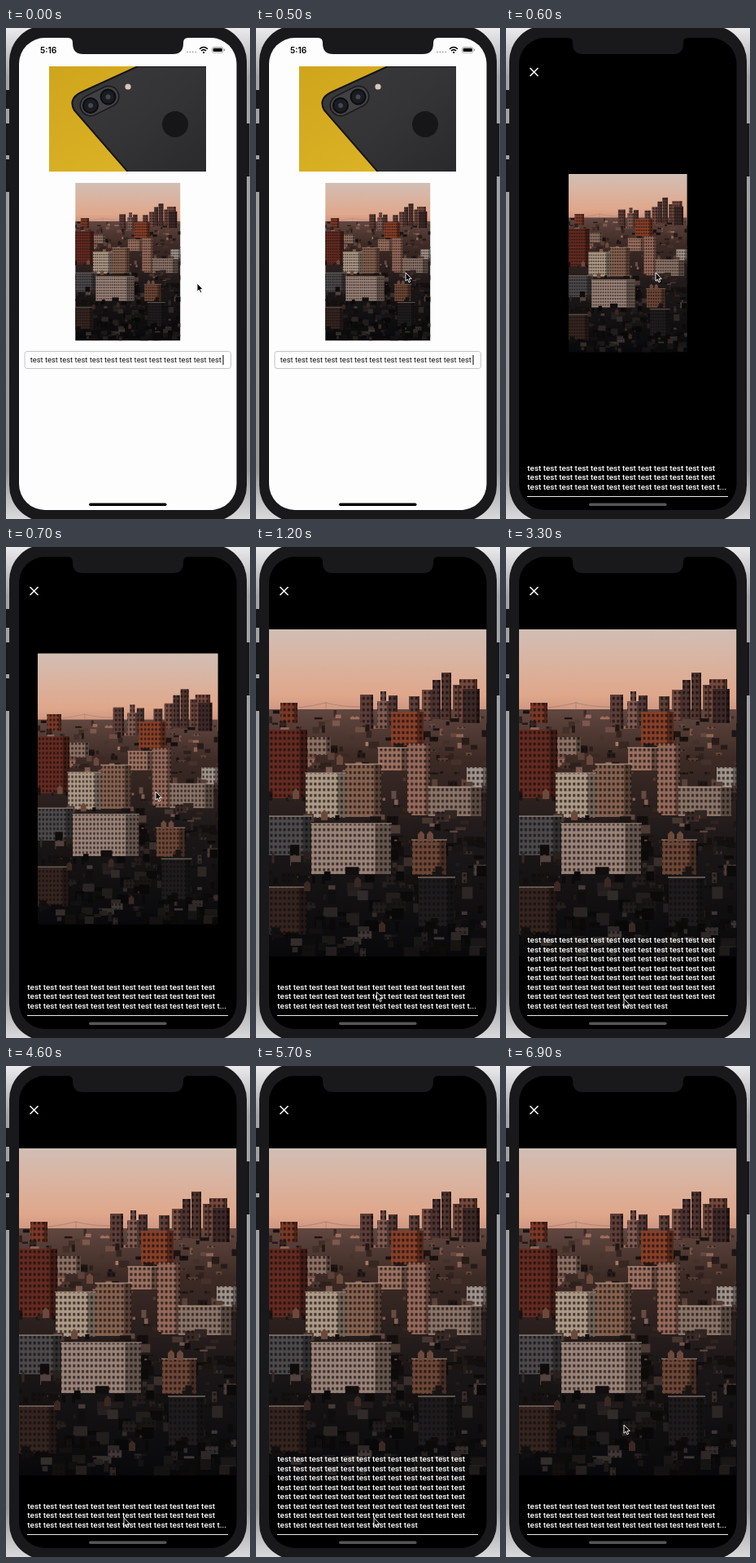
Animation, 300 px wide and 602 px high, one loop 7000 ms. Source, as an HTML page:

```html
<!DOCTYPE html>
<html lang="en">
<head>
<meta charset="utf-8">
<title>Photo viewer</title>
<style>
  html, body { margin: 0; width: 100%; height: 100%; overflow: hidden; background: #c0c0c0; }
  svg { display: block; width: 300px; height: 602px; }
  text { font-family: Roboto, sans-serif; white-space: pre; }
  .clock { font: 600 10.2px Inter, sans-serif; }
</style>
</head>
<body>
<svg viewBox="0 0 300 602">
  <defs>
    <linearGradient id="desk" x2="0" y2="1">
      <stop stop-color="#ebebed"/><stop offset=".1" stop-color="#a4a4a6"/>
      <stop offset=".9" stop-color="#989899"/><stop offset="1" stop-color="#dadadc"/>
    </linearGradient>
    <linearGradient id="sky" x2="0" y2="1">
      <stop stop-color="#d1beb4"/><stop offset=".35" stop-color="#dab3a0"/><stop offset=".7" stop-color="#dfa78b"/>
      <stop offset=".88" stop-color="#cd9580"/><stop offset="1" stop-color="#a4766b"/>
    </linearGradient>
    <linearGradient id="ground" x2="0" y2="1">
      <stop stop-color="#614740"/><stop offset=".2" stop-color="#3d2a25"/>
      <stop offset=".55" stop-color="#1b1718"/><stop offset="1" stop-color="#08080a"/>
    </linearGradient>
    <linearGradient id="yellow" x2="1" y2="1">
      <stop stop-color="#cfa51c"/><stop offset="1" stop-color="#e0b629"/>
    </linearGradient>
    <linearGradient id="metal" x2="1" y2="1">
      <stop stop-color="#3a3a3d"/><stop offset=".5" stop-color="#343437"/><stop offset="1" stop-color="#29292b"/>
    </linearGradient>
    <pattern id="windows" width="5.4" height="7" patternUnits="userSpaceOnUse">
      <path d="M1.3 1.800h2.800v3.600h-2.800z" fill="#100a0a" fill-opacity=".72"/>
    </pattern>
    <clipPath id="screenClip"><rect x="16" y="12" width="267.5" height="579" rx="32"/></clipPath>
    <clipPath id="cityClip"><rect x="16" y="101" width="267.5" height="401"/></clipPath>
    <clipPath id="deviceClip"><rect x="53" y="47" width="193" height="129"/></clipPath>
  </defs>

  <rect width="300" height="602" fill="url(#desk)"/>
  <path d="M0 76h5v23h-5zM0 117h5v39h-5zM0 161h5v40h-5zM294 117h5.500v65h-5.500z" fill="#17171a"/>
  <rect x="4" y="-3" width="292" height="608" rx="44" fill="#19191c"/>

  <g clip-path="url(#screenClip)">
    <rect id="screen" x="16" y="12" width="268" height="579"/>

    <g id="form">
      <text class="clock" x="42" y="30.6">5:16</text>
      <path d="M223 29.5h12" stroke="#aaa" stroke-width="2" stroke-linecap="round" stroke-dasharray="0 3.4"/>
      <g fill="none" stroke="#000" stroke-width="1.5">
        <path d="M238 25.7q5-4.4 10 0M239.9 27.9q3.1-2.6 6.2 0"/>
        <path d="M242 30h2" stroke-width="2"/>
        <rect x="253.4" y="23.5" width="13.6" height="6.8" rx="2" stroke="#999" stroke-width=".8"/>
      </g>
      <rect x="254.6" y="24.7" width="11.2" height="4.4" rx="1"/>
      <path d="M268.4 25.7v2.4" stroke="#888"/>

      <g clip-path="url(#deviceClip)">
        <rect x="53" y="47" width="193" height="129" fill="url(#yellow)"/>
        <path d="M162 47L92 79Q76 87 84 101L153 180H250V47Z" fill="url(#metal)" stroke="#151517" stroke-width="2"/>
        <path d="M104 95L126 84" stroke="#18181a" stroke-width="27" stroke-linecap="round"/>
        <path d="M104 95L126 84" stroke="#414145" stroke-width="24" stroke-linecap="round"/>
        <g fill="#1b1c21" stroke="#0c0c0e" stroke-width="2">
          <circle cx="104" cy="95" r="9"/><circle cx="125.5" cy="84.5" r="9"/>
        </g>
        <circle cx="104" cy="95" r="3" fill="#45474f"/><circle cx="125.5" cy="84.5" r="3" fill="#45474f"/>
        <circle cx="150" cy="72" r="3.6" fill="#d8c7b8"/>
        <circle cx="208" cy="118" r="16" fill="#161618"/>
      </g>

      <rect x="23" y="396.5" width="253.5" height="21" rx="3" fill="#fff" stroke="#c4c4c4"/>
      <text id="field" x="29.7" y="410.2" font-size="9.4" fill="#111"></text>
      <path d="M267 401v12" stroke="#000"/>
    </g>

    <g id="city" clip-path="url(#cityClip)">
      <rect x="16" y="101" width="268" height="115" fill="url(#sky)"/>
      <path d="M52 197Q70 195 86 191Q104 196 128 196M86 190v9" fill="none" stroke="#a97d70" stroke-width=".8"/>
      <rect x="16" y="199" width="268" height="304" fill="url(#ground)"/>
    </g>

    <g id="viewer">
      <path d="M29.5 49l10 10m0-10l-10 10" stroke="#fff" stroke-width="1.6"/>
      <g id="caption" font-size="9.9" font-weight="500" fill="#fff"></g>
      <path d="M26 574.5h247" stroke="#e8e8e8"/>
    </g>
    <rect id="home" x="102" y="582.5" width="95.5" height="3.4" rx="1.7"/>
  </g>

  <path d="M76 11v1q6 0 6 6v1q0 13 13 13h110q13 0 13-13v-1q0-6 6-6v-1z" fill="#19191c"/>
  <path id="cursor" d="M0 0V10.2L2.4 8 4 11.8 5.7 11 4.1 7.4H7.2Z" stroke="#fff" stroke-width=".9"/>
</svg>

<script>
const LOOP = 7000, OPEN = 560;
const TOGGLES = [2700, 3900, 5200, 6200];
const CURSOR = [[0, 235, 313], [450, 184, 300], [700, 184, 300], [1270, 147, 556],
  [1700, 147, 556], [2000, 145, 554], [6450, 145, 554], [6850, 145, 440]];

// Large buildings: x, top, width, height, colour
const TOWERS = [
  [30, 191, 21, 25, '#7a3826'], [128, 181, 16, 42, '#5c3d38'], [149, 189, 15, 34, '#805b52'],
  [153, 177, 7, 30, '#6d4a43'], [163, 182, 11, 30, '#503836'], [188, 183, 13, 30, '#5d403a'],
  [204, 175, 13, 38, '#704a41'], [217, 163, 10, 48, '#4d3433'], [228, 154, 12, 58, '#50352f'],
  [242, 169, 8, 42, '#65443c'], [250, 162, 22, 48, '#74483c'], [254, 174, 21, 42, '#3c2827'],
  [166, 202, 40, 42, '#873f28'], [16, 224, 47, 84, '#632a20'], [63, 233, 29, 22, '#8c7063'],
  [150, 246, 36, 28, '#9a7060'], [186, 241, 28, 88, '#94695a'], [259, 270, 25, 27, '#a1948c'],
  [61, 277, 49, 55, '#ad9a86'], [110, 266, 44, 65, '#84614f'], [212, 294, 65, 36, '#8a7367'],
  [16, 330, 52, 48, '#4b494b'], [68, 339, 98, 62, '#998277'], [192, 359, 42, 43, '#6c4636'],
  [16, 417, 46, 58, '#34241f'], [200, 405, 44, 60, '#1d1b1d']];

const $ = id => document.getElementById(id);
const words = n => Array(n).fill('test').join(' ');
const mix = (a, b, u) => a + (b - a) * u;
const smooth = u => u * u * (3 - 2 * u);

// Damped spring from 0 to 1, with a slight overshoot
function spring(seconds) {
  const t = Math.max(0, seconds), decay = 11, freq = 8.54;
  return 1 - Math.exp(-decay * t) * (Math.cos(freq * t) + decay / freq * Math.sin(freq * t));
}

function add(parent, tag, attrs) {
  const node = document.createElementNS('http://www.w3.org/2000/svg', tag);
  for (const key in attrs) node.setAttribute(key, attrs[key]);
  return parent.appendChild(node);
}

function buildCity() {
  let seed = 11;
  const random = () => (seed = seed * 16807 % 2147483647) / 2147483647;
  const blocks = TOWERS.map(b => [...b, true]);
  for (let i = 0; i < 520; i++) {
    const depth = random(), y = 200 + depth * 292;
    const dark = Math.min(1, depth * 1.3), shade = 0.2 + random() ** 2 * 1.25;
    const rgb = [mix(132, 44, dark), mix(92, 39, dark), mix(78, 38, dark)].map(c => Math.round(c * shade));
    blocks.push([12 + random() * 268, y, 3 + random() * mix(9, 17, depth),
      2 + random() * mix(7, 15, depth), `rgb(${rgb})`, random() < 0.3]);
  }
  blocks.sort((a, b) => a[1] + a[3] - b[1] - b[3]);
  for (const [x, y, width, height, fill, windows] of blocks) {
    const box = { x, y, width, height };
    add($('city'), 'rect', { ...box, fill });
    if (windows) add($('city'), 'rect', { ...box, fill: 'url(#windows)' });
    if (height > 20) {
      add($('city'), 'rect', { x: x + width * 0.8, y, width: width * 0.2, height, opacity: 0.35 });
    }
    if (width > 35 && y > 240) {
      add($('city'), 'rect', { x: x - 1, y: y - 1, width: width + 2, height: 2, fill: '#d0b3a0', opacity: 0.4 });
    }
  }
  // Rooftop water tanks
  for (const [x, y] of [[49, 299], [84, 325], [103, 257], [203, 351], [214, 351], [63, 412], [155, 462], [125, 407]]) {
    add($('city'), 'path', { d: `M${x - 4} ${y + 10}v-9l4-4 4 4v9z`, fill: y > 400 ? '#3b2822' : '#6b4a3c' });
  }
}

const lines = Array.from({ length: 8 }, (_, i) =>
  add($('caption'), 'text', { x: 26.3, y: 566 - 11.55 * (7 - i) }));

function cursorAt(t) {
  const i = CURSOR.findIndex(k => k[0] > t);
  if (i < 0) return CURSOR.at(-1).slice(1);
  const [a, b] = [CURSOR[i - 1], CURSOR[i]];
  const u = smooth((t - a[0]) / (b[0] - a[0]));
  return [mix(a[1], b[1], u), mix(a[2], b[2], u)];
}

function draw(t) {
  const open = t >= OPEN, grown = spring((t - OPEN) / 1000);
  const expanded = TOGGLES.filter(time => t >= time).length % 2 === 1;

  $('screen').setAttribute('fill', open ? '#000' : '#fdfdfd');
  $('home').setAttribute('fill', open ? '#555' : '#000');
  $('form').style.display = open ? 'none' : '';
  $('viewer').style.display = open ? '' : 'none';
  $('city').setAttribute('transform',
    `translate(149.75 ${mix(286.5, 301.5, grown)}) scale(${mix(0.483, 1, grown)}) translate(-149.75 -301.5)`);

  lines.forEach((line, i) => {
    line.style.display = expanded || i > 4 ? '' : 'none';
    line.textContent = i < 7 ? words(12) : expanded ? words(9) : words(12) + ' t...';
  });
  $('cursor').setAttribute('transform', `translate(${cursorAt(t)})`);
}

function tick() {
  draw(performance.now() % LOOP);
  requestAnimationFrame(tick);
}

$('field').textContent = words(13);
buildCity();
tick();
</script>
</body>
</html>
```
